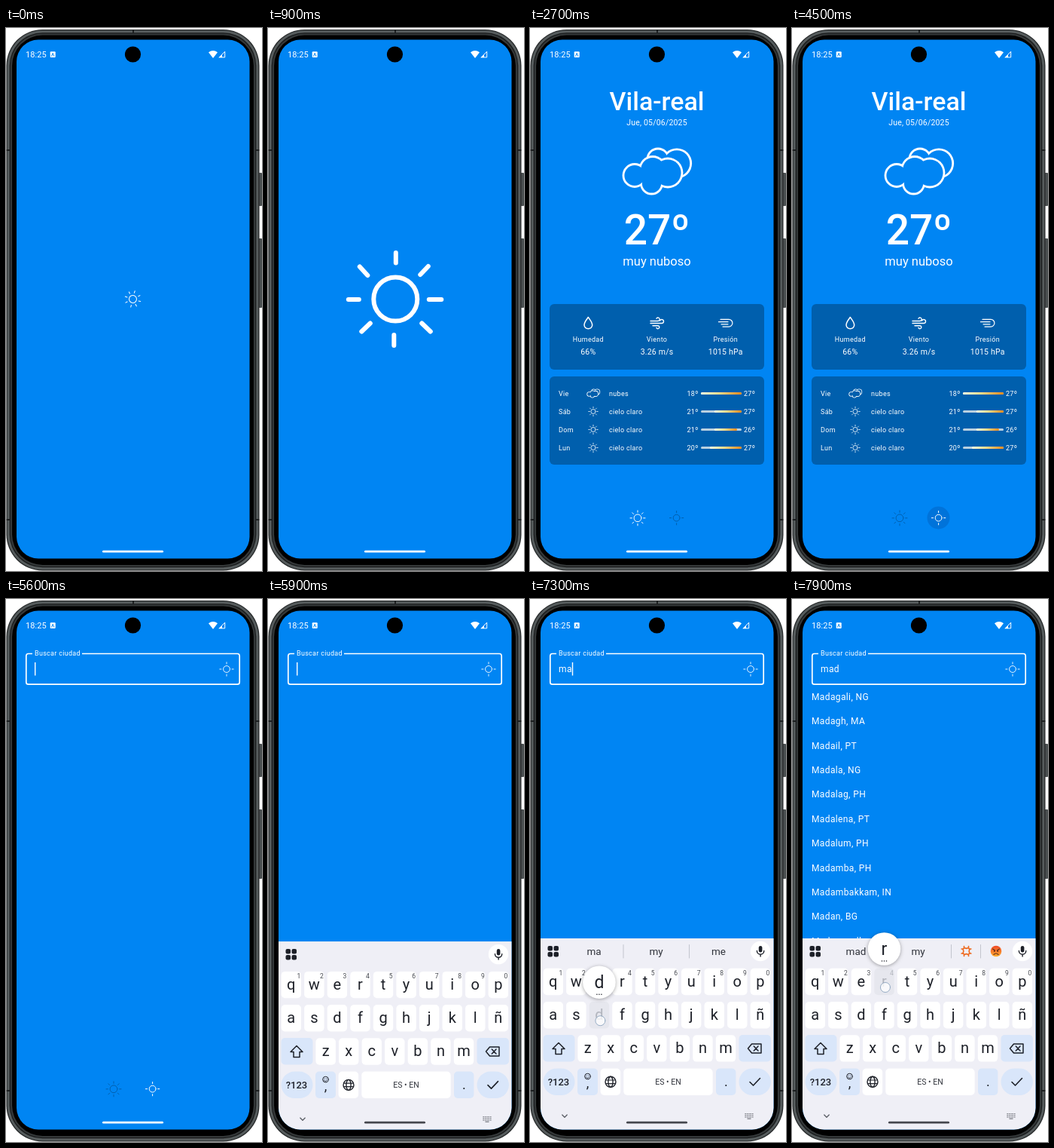
Write an HTML page with a canvas that moves like this. It is 340x720 px and loops after 8 s.

```html
<!DOCTYPE html>
<html lang="es">
<head>
<meta charset="utf-8">
<title>El tiempo</title>
<style>
html, body { margin: 0; width: 100%; height: 100%; overflow: hidden; background: #fff; }
canvas { display: block; width: 340px; height: 720px; }
</style>
</head>
<body>
<canvas id="stage"></canvas>
<script>
const LOOP = 8000;
const BLUE = '#0085f3', CARD = '#005fad', WHITE = '#fff', INK = '#1d2028', KEY = '#d9e6fa';
const FONT = 'Roboto, "Noto Sans", sans-serif';
const canvas = document.getElementById('stage');
const c = canvas.getContext('2d');
const dpr = window.devicePixelRatio || 1;
canvas.width = 340 * dpr;
canvas.height = 720 * dpr;

const clamp = v => Math.max(0, Math.min(1, v));
const span = (t, a, b) => clamp((t - a) / (b - a));
const within = (t, a, b) => t >= a && t < b;

// cubic-bezier(.4, 0, .2, 1)
function ease(x) {
  let lo = 0, hi = 1, u = x;
  for (let i = 0; i < 24; i++) {
    u = (lo + hi) / 2;
    const bx = 1.2 * u * (1 - u) ** 2 + 0.6 * u * u * (1 - u) + u ** 3;
    if (bx < x) lo = u; else hi = u;
  }
  return 3 * u * u * (1 - u) + u ** 3;
}

function box(x, y, w, h, r, fill) {
  c.beginPath();
  c.roundRect(x, y, w, h, r);
  if (fill) { c.fillStyle = fill; c.fill(); }
}
function disc(x, y, r, fill) {
  c.beginPath();
  c.arc(x, y, r, 0, 7);
  c.fillStyle = fill;
  c.fill();
}
function ring(x, y, r, color, w) {
  c.beginPath();
  c.arc(x, y, r, 0, 7);
  c.strokeStyle = color;
  c.lineWidth = w;
  c.stroke();
}
function line(color, w, ...p) {
  c.beginPath();
  c.moveTo(p[0], p[1]);
  for (let i = 2; i < p.length; i += 2) c.lineTo(p[i], p[i + 1]);
  c.strokeStyle = color;
  c.lineWidth = w;
  c.stroke();
}
function path(d, color, w) {
  c.strokeStyle = color;
  c.lineWidth = w;
  c.stroke(new Path2D(d));
}
function text(s, x, y, size, o = {}) {
  c.font = `${o.weight || 400} ${size}px ${FONT}`;
  c.letterSpacing = (o.gap || 0) + 'px';
  c.textAlign = o.align || 'left';
  c.fillStyle = o.color || WHITE;
  c.fillText(s, x, y);
}
const small = (s, x, y, align) => text(s, x, y, 9, { gap: 0.3, align });
const mid = (s, x, y, size, o) => text(s, x, y, size, { align: 'center', ...o });
function at(x, y, scale, draw, turn = 0) {
  c.save();
  c.translate(x, y);
  c.rotate(turn);
  c.scale(scale, scale);
  draw();
  c.restore();
}

function phone() {
  c.fillStyle = WHITE;
  c.fillRect(0, 0, 340, 720);
  box(334, 192, 6, 44, 1, '#4a4f50');
  box(334, 279, 6, 92, 1, '#4a4f50');
  // nested shells, from the metal rim inwards
  [[0, '#26292a'], [1.3, '#565c5d'], [4.2, '#191b1c'], [5.4, '#343839'], [7.6, '#000']].forEach(([d, color]) =>
    box(0.5 + d, 2 + d, 336 - 2 * d, 717.5 - 2 * d, 48 - d, color));
  for (const y of [162, 652]) {
    line('#1c1f20', 2, 1.5, y, 4.5, y);
    line('#1c1f20', 2, 332.5, y, 335.5, y);
  }
  line('#1c1f20', 2, 169, 3, 169, 6);
}

function statusBar() {
  text('18:25', 26, 39, 11, { gap: 0.1 });
  box(58.7, 31.3, 7, 7.8, 1, WHITE);
  line(BLUE, 1, 60.7, 37.2, 62.2, 33.3, 63.7, 37.2);
  c.fillStyle = WHITE;
  c.fill(new Path2D('M269 32.3Q275 27.5 281 32.3L275 40Z'));
  line(WHITE, 1, 283.2, 38.9, 290.7, 38.9, 290.7, 31.2, 283.2, 38.9);
  c.fill(new Path2D('M283 39L287 35V39Z'));
  disc(168.5, 35, 10.6, '#000');
}

function splash(t) {
  const p = t < 900 ? ease(0.22 + 0.78 * t / 900) : 1;
  at(169.3 - (1 - p), 359.5, p, () => {
    ring(0, 0, 29, WHITE, 6);
    [[0.5, -61.5, 0.5, -48], [-2, 47.5, -2, 61.5], [-62.5, 0.5, -48.5, 0.5], [44.5, 0.5, 61, 0.5],
     [43.5, -43.5, 33, -32.5], [-47.5, -43, -37, -31.5], [-33.5, 32, -45, 43], [35, 32, 46.5, 43]]
      .forEach(r => line(WHITE, 6, ...r));
  }, (p - 1) * 2 * Math.PI);
}

function sun(x, y, k, color, w = 1) {
  ring(x, y, 4.9 * k, color, w);
  for (let i = 0; i < 8; i++) {
    const a = i * Math.PI / 4, u = Math.cos(a) * k, v = Math.sin(a) * k;
    line(color, w, x + u * 7.6, y + v * 7.6, x + u * 10, y + v * 10);
  }
}
function locate(x, y, color, w = 1) {
  ring(x, y, 4.4, color, w);
  for (const [u, v] of [[1, 0], [-1, 0], [0, 1], [0, -1]])
    line(color, w, x + u * 7, y + v * 7, x + u * 9.2, y + v * 9.2);
}
function cloud(x, y, k, w, inside) {
  const back = [[170, 174, 14], [195, 179.5, 18.7]];
  const front = [[139, 195.5, 15], [163, 187.5, 17], [183, 192, 19], [161.5, 206, 14]];
  at(x, y, k, () => {
    for (const part of [back, front])
      for (const [grow, color] of [[w / 2, WHITE], [-w / 2, inside]]) {
        for (const [px, py, r] of part) disc(px - 168.5, py - 190, r + grow, color);
        if (part === front) {
          c.fillStyle = color;
          c.fillRect(-20, -5, 25, 17);
        }
      }
  });
}

function weather() {
  mid('Vila-real', 168.5, 109, 34, { weight: 500 });
  mid('Jue, 05/06/2025', 168.5, 129, 10.5, { gap: 0.19 });
  cloud(168.5, 190, 1, 2.8, BLUE);
  mid('27º', 168.5, 286.5, 55, { weight: 500 });
  mid('muy nuboso', 168.5, 315, 16.5);

  box(26, 366, 285, 87, 6, CARD);
  path('M77.3 383.5C75 387 72 390 72 394A5.4 5.4 0 0 0 82.7 394C82.7 390 79.6 387 77.3 383.5Z', WHITE, 1.5);
  path('M160 388.5H170A2.2 2.2 0 1 0 168 385.3M160 391.5H175A2.5 2.5 0 1 0 172.7 388M163 394.7H170A2 2 0 1 1 168 397.5', WHITE, 1.4);
  path('M253 386.3H264A4.9 4.9 0 0 1 264 396.1H256M250.5 389.7H263M254 392.8H263', WHITE, 1.2);
  [['Humedad', '66%'], ['Viento', '3.26 m/s'], ['Presión', '1015 hPa']].forEach(([name, value], i) => {
    const x = 77.3 + i * 91.2;
    small(name, x, 416, 'center');
    mid(value, x, 433, 10.5, { gap: 0.19 });
  });

  box(26, 462, 285, 117, 6, CARD);
  [['Vie', 'nubes', 18, 27], ['Sáb', 'cielo claro', 21, 27],
   ['Dom', 'cielo claro', 21, 26], ['Lun', 'cielo claro', 20, 27]].forEach(([day, sky, low, high], i) => {
    const y = 484.5 + i * 24;
    small(day, 38, y + 3);
    if (i) sun(84, y, 0.62, WHITE, 0.8); else cloud(84.2, y, 0.19, 4.2, CARD);
    small(sky, 105, y + 3);
    small(low + 'º', 208.5, y + 3);
    small(high + 'º', 284, y + 3);
    const x = 227 + (low - 18) * 6, w = (high - low) * 6;
    box(227, y - 1.5, 54, 3, 1.5, '#b9d0e0');
    const g = c.createLinearGradient(x, 0, x + w, 0);
    g.addColorStop(0, '#fffbe3');
    g.addColorStop(0.45, '#ffdc8c');
    g.addColorStop(1, '#f18a1c');
    box(x, y - 1.5, w, 3, 1.5, g);
  });
}

const CITIES = ['Madagali, NG', 'Madagh, MA', 'Madail, PT', 'Madala, NG', 'Madalag, PH', 'Madalena, PT',
  'Madalum, PH', 'Madamba, PH', 'Madambakkam, IN', 'Madan, BG', 'Madanapalle, IN'];

// key, press, release
const HITS = [['m', 6400, 6560], ['a', 6950, 7090], ['d', 7240, 7380], ['r', 7900, 8100]];
const typed = t => HITS.filter(h => t >= h[2]).map(h => h[0]).join('');

function search(t) {
  const word = typed(t), p = ease(span(t, 5300, 5500));
  box(26.8, 72.5, 283.4, 40.7, 3);
  c.strokeStyle = WHITE;
  c.lineWidth = 0.9 + 0.8 * p;
  c.stroke();
  if (p > 0) {
    c.fillStyle = BLUE;
    c.fillRect(68 - 33 * p, 71, 66 * p, 3);
  }
  text('Buscar ciudad', 38, 97 - 22.5 * p, 12 - 3 * p, { gap: 0.375 - 0.075 * p });
  locate(293, 93, WHITE, 0.9);
  if (word) text(word, 38, 97, 12, { gap: 0.375 });
  const last = HITS.filter(h => t >= h[2]).pop();
  const since = t - (last ? last[2] : 5450);
  if (since >= 0 && since % 1000 < 500) {
    const w = word ? c.measureText(word).width : 0;
    c.fillStyle = WHITE;
    c.fillRect(38 + w, 84, 1.4, 17.5);
  }
  if (t >= 7600) CITIES.forEach((s, i) => text(s, 26, 134 + i * 32.37, 12, { gap: 0.375 }));
}

function nav(second, t) {
  const r = span(t, 4250, 4450), fade = 1 - span(t, 4550, 4850);
  if (r > 0 && fade > 0) disc(194.5, 649.5, 15 * r, `rgba(0,80,165,${0.32 * fade})`);
  sun(143, 649.8, 1, second ? CARD : WHITE);
  locate(194.6, 649.6, second ? WHITE : CARD);
}

const ROWS = ['qwertyuiop', 'asdfghjklñ', 'zxcvbnm'];
function keyPos(ch) {
  const row = ROWS.findIndex(r => r.includes(ch));
  return [30.8 + (ROWS[row].indexOf(ch) + (row === 2 ? 1.5 : 0)) * 30.56, 507.5 + row * 44.2];
}

function suggestions(t) {
  for (const [x, y] of [[23.5, 460], [31.5, 460], [23.5, 468], [31.5, 468]]) box(x, y, 6.5, 6.5, 2, INK);
  disc(306, 467, 13.2, WHITE);
  box(303.8, 460, 4.6, 8.5, 2.3, INK);
  path('M301.4 466.5A4.7 4.7 0 0 0 310.8 466.5M306.1 471.3V474', INK, 1.4);
  const word = typed(t);
  if (!word) return;
  const full = word === 'mad';
  const dark = { color: '#30333b' };
  const sep = x => line('#c3c5ce', 1, x, 458.5, x, 476);
  mid(word, 85, 472, 13.5, dark);
  mid('my', 167.5, 472, 13.5, dark);
  sep(124);
  sep(211.5);
  if (!full) return mid('me', 250.5, 472, 13.5, dark);
  sep(250.5);
  for (let i = 0; i < 4; i++)
    at(231.5, 467, 1, () => path('M-6.3 -3Q-2.3 -2.3 -3 -6.3M-1.8 -4.2Q0 -3 1.8 -4.2', '#ee6a20', 1.7), i * Math.PI / 2);
  const g = c.createLinearGradient(0, 460, 0, 475);
  g.addColorStop(0, '#ef4b28');
  g.addColorStop(1, '#ffb32e');
  disc(271, 467, 7.3, g);
  path('M266.5 464L269.7 466M275.5 464L272.3 466M268 471.5Q271 468.5 274 471.5', '#5c2a16', 1.1);
  disc(268.8, 467, 0.9, '#5c2a16');
  disc(273.2, 467, 0.9, '#5c2a16');
}

function keyboard(t) {
  const rise = ease(span(t, 5650, 5950));
  if (!rise) return;
  const hit = HITS.find(h => within(t, h[1], h[2]));
  c.save();
  c.translate(0, 256 * (1 - rise));
  c.fillStyle = '#efeff6';
  c.fillRect(13, 450, 312, 256);
  suggestions(t);

  ROWS.forEach((row, n) => [...row].forEach((ch, i) => {
    const [x, y] = keyPos(ch), down = hit && hit[0] === ch;
    box(x - 13.2, y - 17.7, 26.4, 35.4, 5, down ? '#e6e7ee' : WHITE);
    mid(ch, x, y + 6.2, 20, { color: down ? '#b3b6be' : INK });
    if (!n) mid(String((i + 1) % 10), x + 10, y - 8.3, 8.5, { color: down ? '#b3b6be' : '#44474f' });
  }));

  box(17.5, 578, 42, 35.4, 5, KEY);
  path('M38 588.5L46 596.5H42V603.5H34V596.5H30Z', INK, 1.5);
  box(277.5, 578, 42.5, 35.4, 5, KEY);
  path('M289.5 596L294.5 590H307V602H294.5ZM297.3 593L303 599M303 593L297.3 599', INK, 1.5);

  box(17.5, 622.5, 42, 35.5, 18, KEY);
  mid('?123', 38, 645, 13, { color: INK, weight: 500 });
  box(63, 622.5, 27, 35.5, 5, KEY);
  ring(76.5, 633, 3.8, INK, 1);
  path('M74.5 634Q76.5 637 78.5 634', INK, 0.9);
  disc(75.2, 632, 0.6, INK);
  disc(77.8, 632, 0.6, INK);
  mid(',', 76.5, 648, 18, { color: INK });
  box(93.6, 622.5, 26.6, 35.5, 5, WHITE);
  ring(107, 640.3, 7, INK, 1.4);
  c.beginPath();
  c.ellipse(107, 640.3, 3.1, 7, 0, 0, 7);
  c.stroke();
  path('M100.5 638H113.5M100.5 642.6H113.5', INK, 1.2);
  box(124.3, 622.5, 118.3, 35.5, 5, WHITE);
  mid('ES • EN', 183.5, 644, 10.5, { color: '#33363e' });
  box(247, 622.5, 26.4, 35.5, 5, KEY);
  mid('.', 260.3, 646, 18, { color: INK });
  box(277.5, 622.5, 42.5, 35.5, 18, KEY);
  path('M292 640.5L296.5 645L305.5 635.5', INK, 1.6);

  path('M42.8 684L46 687.2L49.2 684', '#5b5e66', 1.3);
  for (let i = 0; i < 15; i++) {
    c.fillStyle = '#5b5e66';
    c.fillRect(285.5 + i % 5 * 2.4, 682 + Math.floor(i / 5) * 2.2, 1.3, 1.2);
  }
  c.fillRect(288.5, 688.6, 5, 1);

  if (hit) {
    const [x, y] = keyPos(hit[0]);
    const px = Math.max(37, Math.min(300, x)), py = y - 43.5;
    c.save();
    c.shadowColor = 'rgba(0,0,0,.35)';
    c.shadowBlur = 5 * dpr;
    c.shadowOffsetY = dpr;
    disc(px, py, 21.8, WHITE);
    c.restore();
    mid(hit[0], px, py + 7.5, 23, { color: INK });
    for (const d of [-3, 0, 3]) disc(px + d, py + 16, 0.8, INK);
    touch(x + 1.5, y + 7.5);
  }
  c.restore();
}

function touch(x, y) {
  disc(x, y, 6.5, 'rgba(255,255,255,.75)');
  ring(x, y, 6.5, 'rgba(120,150,180,.75)', 1);
}

function veil(alpha) {
  if (alpha <= 0) return;
  c.globalAlpha = alpha;
  c.fillStyle = BLUE;
  c.fillRect(13, 48, 312, 657);
  c.globalAlpha = 1;
}

function screen(t) {
  c.fillStyle = BLUE;
  c.fillRect(13, 15, 312, 690);
  const second = t >= 4400;
  if (t < 2450) {
    splash(t);
    veil(span(t, 2300, 2450));
  } else if (t < 4700) {
    weather();
    if (t < 2700) nav(false, t);
    veil(Math.max(1 - span(t, 2450, 2680), span(t, 4520, 4700)));
    if (t >= 2700) nav(second, t);
  } else {
    search(t);
    veil(1 - span(t, 4700, 4900));
    if (t < 6000) nav(true, t);
  }
  statusBar();
  if (within(t, 4200, 4400)) touch(196, 652);
  if (within(t, 5200, 5320)) touch(150, 95);
  if (t >= 5650) keyboard(t);
  box(128, 692.8, 81, 2.8, 1.4, t >= 5720 ? '#45474e' : WHITE);
}

function draw(t) {
  c.setTransform(dpr, 0, 0, dpr, 0, 0);
  c.lineCap = 'round';
  c.lineJoin = 'round';
  phone();
  c.save();
  box(14, 15.5, 309.5, 688, 29);
  c.clip();
  screen(t);
  c.restore();
}

const start = performance.now();
function tick() {
  draw((performance.now() - start) % LOOP);
  requestAnimationFrame(tick);
}
tick();
</script>
</body>
</html>
```
